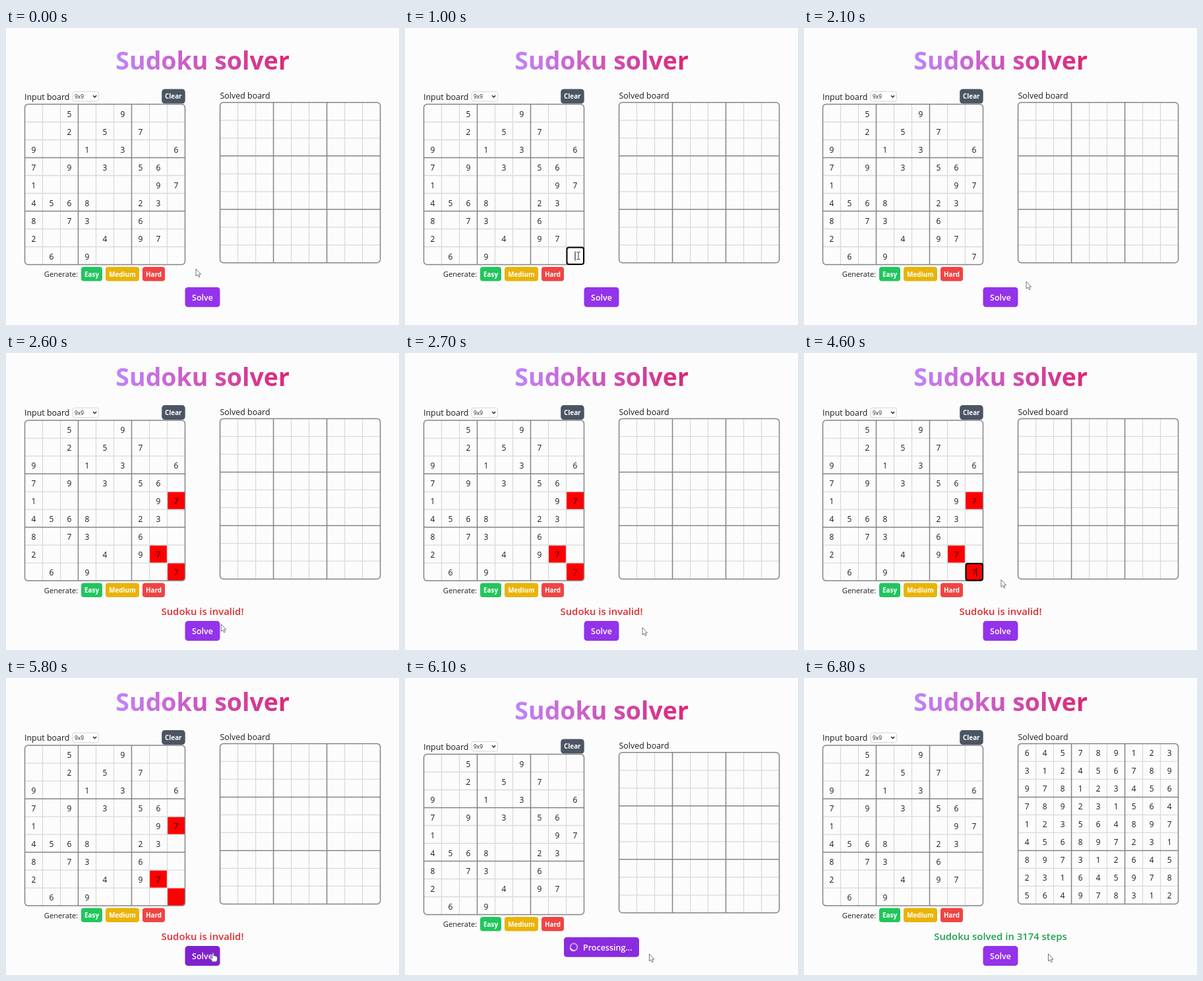
An HTML page that plays this animation: 596x450 px, repeating every 7.8 s.

```html
<!DOCTYPE html>
<html lang="en">
<head>
<meta charset="utf-8">
<title>Sudoku solver</title>
<style>
  html, body { margin: 0; width: 100%; height: 100%; overflow: hidden; background: #fcfcfc; }
  svg { display: block; width: 596px; height: 450px; font-family: "Open Sans", "Noto Sans", sans-serif; fill: #1c1c1f; }
  .mid { text-anchor: middle; }
  .title { font-size: 37.5px; font-weight: 700; fill: url(#fade); }
  .label { font-size: 12.45px; }
  .digit { font-size: 12px; text-anchor: middle; }
  .small { font-size: 9.9px; font-weight: 700; fill: #fff; text-anchor: middle; }
  .big { font-size: 12.5px; font-weight: 600; fill: #fff; }
  .message { font-size: 14.9px; font-weight: 600; text-anchor: middle; }
  .thin { stroke: #dadada; stroke-width: 1.3; fill: none; }
  .thick { stroke: #858585; stroke-width: 1.5; fill: none; }
  .pointer { fill: #fff; stroke: #555; stroke-width: .8; stroke-linejoin: round; }
</style>
</head>
<body>
<svg viewBox="0 0 596 450">
  <defs>
    <linearGradient id="fade">
      <stop offset="0" stop-color="#c084fc"/>
      <stop offset="1" stop-color="#db2777"/>
    </linearGradient>
  </defs>

  <g id="upper">
    <text class="title mid" x="298.2" y="63">Sudoku solver</text>
    <text class="label" x="28" y="108.7">Input board</text>
    <rect x="101" y="96.5" width="39.5" height="14.5" rx="3" fill="#fff" stroke="#d4d6da"/>
    <text x="104" y="107" font-size="8.4">9x9</text>
    <path d="M132 102.3l2.6 2.6 2.6-2.6" fill="none" stroke="#222" stroke-width="1.4"/>
    <rect x="236.2" y="92.5" width="35.5" height="22" rx="4.5" fill="#4b5563"/>
    <text class="small" x="253.8" y="107.3">Clear</text>
    <text class="label" x="324.5" y="107">Solved board</text>
    <g id="input" transform="translate(28.5 115.5)"></g>
    <g id="solved" transform="translate(324.6 112.8)"></g>
    <text x="57.8" y="377.3" font-size="11.2">Generate:</text>
    <g id="levels"></g>
  </g>

  <text id="message" class="message" x="298" y="397"></text>

  <g id="lower">
    <g id="solve">
      <rect id="solveBox" x="271.5" y="392.7" width="53" height="30" rx="4.5"/>
      <text class="big mid" x="298" y="412.5">Solve</text>
    </g>
    <g id="processing">
      <rect x="241" y="392.7" width="114" height="30" rx="4.5" fill="#8b2be0"/>
      <g fill="none" stroke="#fff" stroke-width="2">
        <circle cx="256" cy="407.7" r="5.4" opacity=".55"/>
        <path id="spinner" d="M256 402.3a5.4 5.4 0 0 1 5.4 5.4"/>
      </g>
      <text class="big" x="270" y="412.5">Processing...</text>
    </g>
  </g>

  <g id="cursor">
    <path id="arrow" class="pointer" d="M0 0V11L2.5 8.8 4.2 12.6 6 11.8 4.3 8.2H7.6Z"/>
    <path id="hand" class="pointer" d="M-1 0.6Q0-.6 1 .6V5Q2.3 4 3 5.4 4.4 4.6 5 6 6.4 5.6 6.5 7V10Q6.4 12 5 14H-1Q-2.6 11.4-4 9-4.3 7-2.7 7.6L-1 9.2Z"/>
    <path id="beam" d="M-2.5-5.5H-.6L0-5 .6-5.5H2.5M0-5V5M-2.5 5.5H-.6L0 5 .6 5.5H2.5" fill="none" stroke="#333"/>
  </g>
</svg>

<script>
const LOOP = 7800, CELL = 27, SHIFT = 13.4;
const givens = [
  "..5..9...", "..2.5.7..", "9..1.3..6",
  "7.9.3.56.", "1......97", "4568..23.",
  "8.73..6..", "2...4.97.", ".6.9....."
];
const solution = [
  "645789123", "312456789", "978123456",
  "789231564", "123564897", "456897231",
  "897312645", "231645978", "564978312"
];

// Pointer stops: time, x, y
const path = [
  [0, 288, 365], [100, 288, 365], [1000, 263, 345], [1150, 263, 345],
  [1400, 298, 351], [1750, 298, 351], [2100, 337, 384], [2400, 314, 409],
  [2550, 314, 409], [2700, 360, 416], [3350, 360, 416], [4100, 268, 335],
  [4250, 268, 335], [4500, 299, 343.5], [4950, 299, 343.5], [5700, 314, 416],
  [5850, 314, 416], [6100, 370.5, 418], [LOOP, 370.5, 418]
];

const $ = id => document.getElementById(id);

function add(parent, tag, attrs, text = "") {
  const node = document.createElementNS("http://www.w3.org/2000/svg", tag);
  for (const key in attrs) node.setAttribute(key, attrs[key]);
  node.textContent = text;
  return parent.appendChild(node);
}

function addLines(parent) {
  const size = CELL * 9;
  for (const thick of [false, true])
    for (let i = 1; i < 9; i++)
      if ((i % 3 === 0) === thick)
        add(parent, "path", {
          class: thick ? "thick" : "thin",
          d: `M${i * CELL} 0V${size}M0 ${i * CELL}H${size}`
        });
  add(parent, "rect", { class: "thick", width: size, height: size, rx: 5 });
}

function addDigit(parent, row, col, digit) {
  return add(parent, "text", {
    class: "digit", x: (col + .5) * CELL, y: (row + .5) * CELL + 5.5
  }, digit);
}

function addDigits(parent, rows) {
  rows.forEach((line, row) => [...line].forEach((digit, col) => {
    if (digit !== ".") addDigit(parent, row, col, digit);
  }));
}

const input = $("input"), solved = $("solved");
const conflicts = add(input, "g", { fill: "#f00" });
for (const [row, col] of [[4, 8], [7, 7], [8, 8]])
  add(conflicts, "rect", { x: col * CELL, y: row * CELL, width: CELL, height: CELL, rx: row === 8 ? 3 : 0 });
addLines(input);
addDigits(input, givens);
const wrongDigits = add(input, "g", { fill: "#600000" });
addDigit(wrongDigits, 4, 8, "7");
addDigit(wrongDigits, 7, 7, "7");
const typed = addDigit(input, 8, 8, "7");
const focus = add(input, "rect", {
  x: 217, y: 217, width: 25.5, height: 25.5, rx: 3, fill: "none", stroke: "#000", "stroke-width": 2
});
const caret = add(input, "path", { stroke: "#000", "stroke-width": 1 });

addLines(solved);
const answer = add(solved, "g", {});
addDigits(answer, solution);

for (const [name, x, width, fill] of [["Easy", 114, 32, "#22c55e"], ["Medium", 151, 51, "#eab308"], ["Hard", 207, 34, "#ef4444"]]) {
  add($("levels"), "rect", { x, y: 362, width, height: 21.5, rx: 4, fill });
  add($("levels"), "text", { class: "small", x: x + width / 2, y: 376.6 }, name);
}

const show = (node, on) => node.setAttribute("display", on ? "inline" : "none");
const moveY = (node, y) => node.setAttribute("transform", `translate(0 ${y})`);

function pointerAt(t) {
  const i = path.findIndex(stop => stop[0] > t);
  const [t0, x0, y0] = path[i - 1], [t1, x1, y1] = path[i];
  const p = (t - t0) / (t1 - t0), k = p * p * (3 - 2 * p);
  return [x0 + (x1 - x0) * k, y0 + (y1 - y0) * k];
}

function render(t) {
  const within = (from, to) => t >= from && t < to;
  const invalid = within(2600, 5900), processing = within(5900, 6300), done = t >= 6300;
  const offset = invalid || done ? SHIFT : 0;
  const hasDigit = within(1200, 4800);
  const focused = within(900, 1900) || within(4200, 4900);

  moveY($("upper"), -offset);
  moveY($("lower"), offset);

  show(conflicts, invalid);
  show(wrongDigits, invalid);
  show(typed, hasDigit);
  typed.style.fill = invalid ? "#600000" : "";
  show(focus, focused);
  show(caret, focused);
  caret.setAttribute("d", `M${hasDigit ? 233.3 : 229.5} 223v14`);
  show(answer, done);

  const message = $("message");
  message.textContent = invalid ? "Sudoku is invalid!" : done ? "Sudoku solved in 3174 steps" : "";
  message.style.fill = invalid ? "#dc2f36" : "#22a04f";

  const [x, y] = pointerAt(t);
  const hover = within(2350, 2600) || within(5650, 5900);
  const inCell = within(900, 1250) || within(4050, 4300);
  $("cursor").setAttribute("transform", `translate(${x} ${y})`);
  show($("hand"), hover);
  show($("beam"), inCell);
  show($("arrow"), !hover && !inCell);

  show($("solve"), !processing);
  $("solveBox").style.fill = hover ? "#7e22ce" : "#9333ea";
  show($("processing"), processing);
  $("spinner").setAttribute("transform", `rotate(${(t - 5900) * .36 + 90} 256 407.7)`);
}

const start = performance.now();
function tick() {
  render((performance.now() - start) % LOOP);
  requestAnimationFrame(tick);
}
tick();
</script>
</body>
</html>
```
